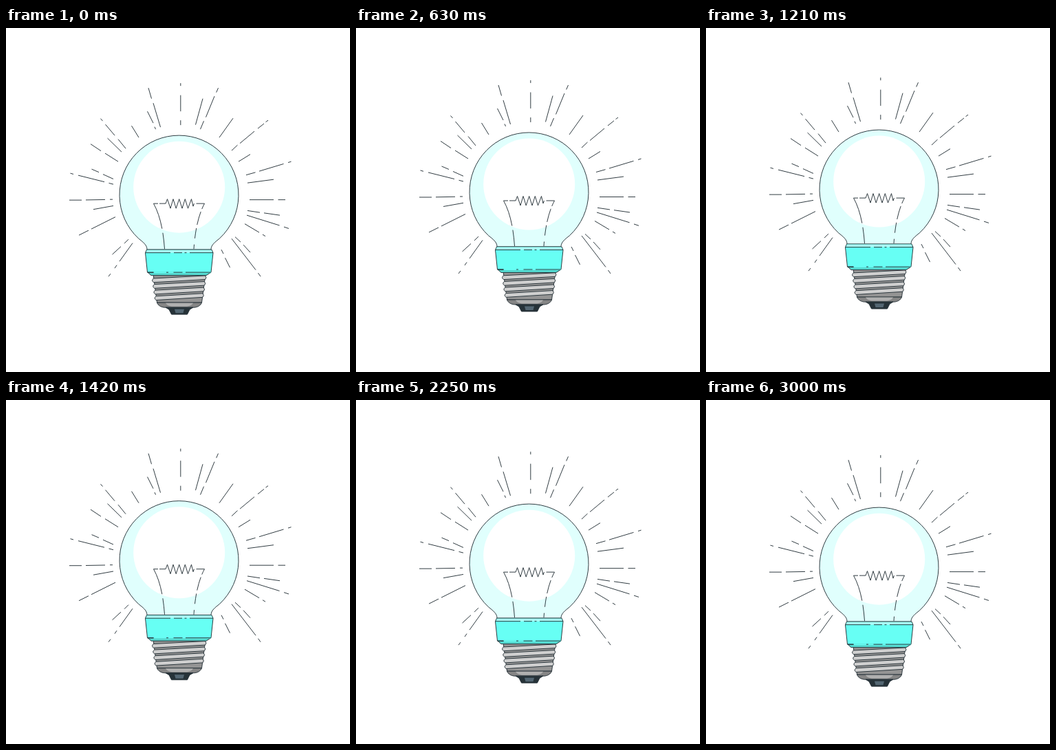
Animation of 500 by 500 pixels, one loop 3.04 s. Source, as an HTML page:

```html
<!DOCTYPE html>
<html lang="en">
<head>
<meta charset="utf-8">
<title>Light bulb</title>
<style>
html, body { margin: 0; width: 100%; height: 100%; overflow: hidden; background: #fff; }
svg { display: block; width: 500px; height: 500px; }
.line { fill: none; }
.flat { stroke: none; }
</style>
</head>
<body>
<svg viewBox="0 0 500 500">
<g id="bulb" stroke="#263238" stroke-width=".95" stroke-linejoin="round">
  <path class="line" d="
    M207 87L211.5 102.5M214 109L224.5 144M205.5 121L214 138M216 143.500L217.500 147
    M253.800 80V84M253.800 97.500V121M253.800 134V141
    M308.500 87L305.700 93.500M303 99L290.500 129.500M287.500 135L282.500 147M286 102.500L275.500 140.500
    M330 131L310 159M381 134L377.500 136.500M375 138.800L366 146M361 150L340 167.500M336.500 170L328 178
    M355 183.500L338 194M414.500 194L410 195.400M403.500 197.300L368 208M362.500 209.700L349 213.500
    M389 220L351 225M354 249.500H389M395.500 249.500H406
    M351 265.300L369 268M375 268.700L398 272M350 272L397.500 286.800M404 289L411 291.300
    M347 284.500L368 297M373 300L377 302.500M328 306L363 351.500M366.500 356L370 361
    M333 303.500L341 311M345 315L355 326M313 322L316 328M318.500 334L325.500 348
    M182.500 142L193 159M137.500 131.500L140.500 135M144.500 140L158 156M163 161.500L174 175
    M147.500 160L168 180M123 168.500L138 178.500M144 182L163 194
    M124.500 205L135 209.500M141 212.500L156 219.300
    M93.500 211L98 212.300M105 214L143 223.500M149.500 225.300L156 227M127 263.500L156 258.300
    M92 250H110M116 249.800L144 249.300M151 249H155
    M106 301L120 294M124 292L159 274.500M178 307L172 313M167 317.500L154.500 329
    M184 312.500L165 339M161 344.500L158 349M152 357L149 361"/>

  <path fill="#e0fffd" d="M205 322C205 315 199 311 192.500 305.700A86.500 86.500 0 1 1 310.500 305.700C304 311 298 315 298 322Z"/>
  <circle class="flat" cx="251.700" cy="231" r="66.500" fill="#fff"/>

  <g class="line">
    <path d="M214.500 255H221M223 255H232L234.500 248.500L239 262L243 248.500L247.200 262L251.700 248.500L256 262L260.300 248.500L264.500 262L269.500 248.500L272 259L273.500 255M276.500 255H288.500"/>
    <path stroke-dasharray="39 6 40" d="M214.500 255Q227.500 278 230.500 321"/>
    <path stroke-dasharray="9 4 20 5 15 9 10" d="M288.500 255Q276 278 273 321"/>
  </g>

  <path fill="#949494" d="M214 358H290L284.500 399H219.500Z"/>
  <g id="threads" fill="#cfcfcf"></g>
  <path fill="#858585" d="M219.500 399H284.500C283 403 279 405.500 274 406H230C225 405.500 221 403 219.500 399Z"/>
  <path class="flat" fill="#b0b0b0" d="M232 399.500H272Q270 403.500 263 404.500H241Q234 403.500 232 399.500Z"/>
  <path fill="#263238" d="M232 406H272L267 409L263.500 416H240.500L237 409Z"/>
  <path class="flat" fill="#546773" d="M245 408.500H259L257.500 414H246.500Z"/>

  <path fill="#53d8cf" d="M206 355H298L291 359.500H211Z"/>
  <path fill="#67fff4" d="M204.500 322H299L301 326.500L298 355H205.500L202.500 326.500Z"/>
  <path class="flat" fill="#a9fff8" d="M205 322.500H298.500L300 326.500H203.500Z"/>
  <path class="line" d="M202.500 326.500H239M244 326.500H256M259.500 326.500H262.500M267 326.500H301"/>
  <path class="flat" fill="#67fff4" d="M214.500 354H298V356H214.500Z"/>
  <path class="line" d="M205.500 355H214.500M233 355H236M243.500 355H256.500M261 355H298"/>
</g>
</svg>
<script>
const FPS = 24, LAST = 72, PERIOD = 3040, RISE = 10;
const bulb = document.getElementById("bulb");

// Slanted screw threads, each slightly narrower than the one above.
document.getElementById("threads").innerHTML = [0, 1, 2, 3].map(i => {
  const left = 214.5 + i * 1.2, right = 289.5 - i * 1.2, y = 363.8 + i * 8.6;
  return `<path d="M${left} ${y}L${right} ${y - 4}q3 2.800 0 5.600L${left} ${y + 5.8}q-4 -2.900 0 -5.800Z"/>`;
}).join("");

// Steady rise and fall in 24 fps steps; the last step rests at the start pose.
function draw() {
  const time = performance.now() % PERIOD;
  const step = Math.min(LAST, Math.floor((time + 5) * FPS / 1000));
  const lift = RISE * (1 - Math.abs(1 - 2 * step / LAST));
  bulb.setAttribute("transform", `translate(0 ${0.15 - lift})`);
  requestAnimationFrame(draw);
}
draw();
</script>
</body>
</html>
```
